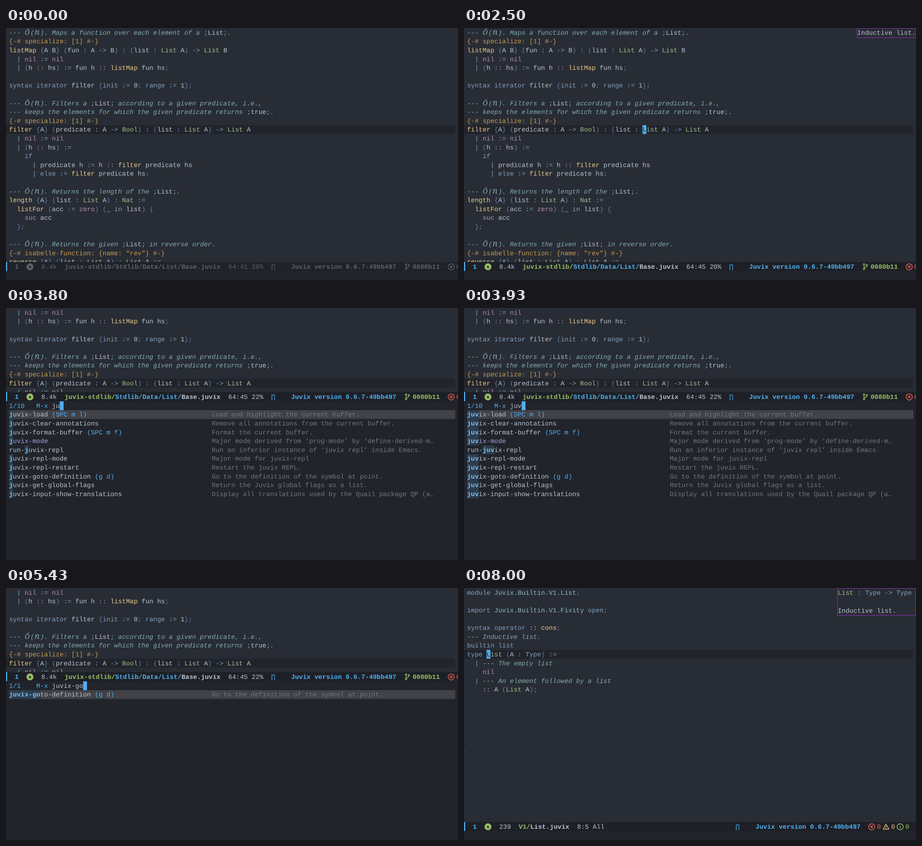
An HTML page with a canvas that plays this animation: 1000x560 px, repeating every 9.16 s.

```html
<!DOCTYPE html>
<html lang="en">
<head>
<meta charset="utf-8">
<title>Go to definition</title>
<style>
html, body { margin: 0; width: 100%; height: 100%; overflow: hidden; background: #282c34; }
canvas { display: block; width: 1000px; height: 560px; }
</style>
</head>
<body>
<canvas id="stage"></canvas>
<script>
const LOOP = 9160;
const CW = 8.625, LH = 19.6, X0 = 6.7, Y0 = 0.3;
const SIZE = '14.375px', MONO = '"Liberation Mono", "Noto Sans Mono", monospace';
const C = {
  bg: '#282c34', dark: '#21242b', bar: '#1d2026', fg: '#bbc2cf', dim: '#5b6268',
  blue: '#51afef', green: '#98be65', red: '#e8655f', yellow: '#ecbe7b', violet: '#a9a1e1',
  kw: '#81a1c1', fn: '#ebcb8b', type: '#a3be8c', con: '#b48ead', mod: '#8fbcbb',
  delim: '#5e81ac', note: '#83adad', pragma: '#c89b50', hint: '#73767d',
  row: '#404247', match: '#2c3d4e', hit: '#7cbdee', frame: '#7d2fab', tilde: '#4b5059'
};

const canvas = document.getElementById('stage');
const ctx = canvas.getContext('2d');
const dpr = window.devicePixelRatio || 1;
canvas.width = 1000 * dpr;
canvas.height = 560 * dpr;

const baseCode = `--- @ Maps a function over each element of a ;List;.
{-# specialize: [1] #-}
listMap {A B} (fun : A -> B) : (list : List A) -> List B
  | nil := nil
  | (h :: hs) := fun h :: listMap fun hs;

syntax iterator \`filter {init := 0; range := 1};

--- @ Filters a ;List; according to a given predicate, i.e.,
--- keeps the elements for which the given predicate returns ;true;.
{-# specialize: [1] #-}
filter {A} (predicate : A -> Bool) : (list : List A) -> List A
  | nil := nil
  | (h :: hs) :=
    if
      | predicate h := h :: filter predicate hs
      | else := filter predicate hs;

--- @ Returns the length of the ;List;.
length {A} (list : List A) : Nat :=
  listFor (acc := zero) (_ in list) {
    suc acc
  };

--- @ Returns the given ;List; in reverse order.
{-# isabelle-function: {name: "rev"} #-}
reverse {A} (list : List A) : List A :=`.split('\n');

const listCode = `module Juvix.Builtin.V1.List;

import Juvix.Builtin.V1.Fixity open;

syntax operator \`:: cons;
--- Inductive list.
builtin ^list
type List (A : Type) :=
  | --- The empty list
    nil
  | --- An element followed by a list
    :: A (List A);`.split('\n');

// name | key binding | description
const parseRows = text => text.split('\n').map(l => l.split('|'));
const allCommands = parseRows(`juvix-load|(SPC m l)|Load and highlight the current buffer.
juvix-clear-annotations||Remove all annotations from the current buffer.
markdown-export||Run Markdown on the current buffer, save to file, and re…
projectile-save-project-buffers|(SPC p s)|Save all project buffers.
project-query-replace-regexp||Query-replace REGEXP in all the files of the project.
+lookup/references|(SPC c D)|Show a list of usages of IDENTIFIER (defaults to the sym…
query-replace-regexp|(C-M-%)|Replace some things after point matching REGEXP with TO-…
projectile-replace-regexp||Replace a regexp in the project using ‘tags-query-replac…
regexp-builder||Construct a regexp interactively.
magit-blame||Show the commits that added or removed lines in the visi…
doom-big-font-mode|(SPC t b)|Globally resizes your fonts for streams, screen-sharing …
lsp-workspace-restart||Restart the workspace WORKSPACE and the language server …
magit-abort-dwim||Abort current operation.
lsp||Entry point for the server startup.
lsp-goto-implementation||Find implementations of the symbol under point.
sort-lines||Sort lines in region alphabetically; REVERSE non-nil mea…
auto-revert-mode||Toggle reverting buffer when the file changes (Auto-Reve…`);
const juvixCommands = parseRows(`juvix-load|(SPC m l)|Load and highlight the current buffer.
juvix-clear-annotations||Remove all annotations from the current buffer.
juvix-format-buffer|(SPC m f)|Format the current buffer.
juvix-mode||Major mode derived from ‘prog-mode’ by ‘define-derived-m…
run-juvix-repl||Run an inferior instance of ‘juvix repl’ inside Emacs.
juvix-repl-mode||Major mode for juvix-repl
juvix-repl-restart||Restart the juvix REPL.
juvix-goto-definition|(g d)|Go to the definition of the symbol at point.
juvix-get-global-flags||Return the Juvix global flags as a list.
juvix-input-show-translations||Display all translations used by the Quail package QP (a…`);

const words = {
  kw: 'syntax iterator init range if else in module import operator open builtin type Type | : := ->',
  fn: 'listMap filter length listFor reverse cons',
  type: 'List Bool Nat',
  con: 'nil zero suc ::',
  delim: '{ } ( ) ;'
};
const colorOf = {};
for (const k in words) for (const w of words[k].split(' ')) colorOf[w] = C[k];

const rowTop = i => Y0 + i * LH;

function rect(x, y, w, h, color) {
  ctx.fillStyle = color;
  ctx.fillRect(x, y, w, h);
}

// Writes on the character grid and returns the x after the text.
function put(s, x, top, color, style = '') {
  ctx.font = `${style} ${SIZE} ${MONO}`;
  ctx.fillStyle = color;
  ctx.fillText(s, x, top + 14.4);
  return x + s.length * CW;
}

function bigO(x, top) {
  const script = (ch, at, size) => {
    ctx.font = `italic ${size}px "Noto Serif", "DejaVu Serif", serif`;
    ctx.fillStyle = C.note;
    ctx.fillText(ch, at, top + 14.4);
  };
  script('O', x, 15);
  ctx.strokeStyle = C.note;
  ctx.lineWidth = 1;
  ctx.beginPath();
  ctx.arc(x + 8, top + 4, 2.6, 2.6, 5.6);
  ctx.stroke();
  x = put('(', x + 12.9, top, C.note, 'italic');
  script('n', x + 0.5, 18);
  return put(').', x + 12.9, top, C.note, 'italic');
}

function comment(s, x, top) {
  for (const part of s.split(/(@|;\w+;)/)) {
    if (part === '@') x = bigO(x, top);
    else if (part[0] === ';') {
      x = put(';', x, top, C.note);
      x = put(part.slice(1, -1), x, top, C.fg);
      x = put(';', x, top, C.note);
    } else x = put(part, x, top, C.note, 'italic');
  }
}

function codeLine(line, x, top) {
  if (line.startsWith('{-#')) return put(line, x, top, C.pragma);
  const cut = line.indexOf('---');
  const code = cut < 0 ? line : line.slice(0, cut);
  for (let t of code.match(/\s+|[`^]?(?:[\w.]+|::)|:=|->|\S/g) || []) {
    let color = colorOf[t] || (/\w\.\w/.test(t) ? C.mod : C.fg);
    if (t[0] === '`' || t[0] === '^') {
      color = t[0] === '^' ? C.kw : C.fg;
      t = t.slice(1);
    }
    x = put(t, x, top, color);
  }
  if (cut >= 0) comment(line.slice(cut), x, top);
}

function buffer(lines, first, current, bottom) {
  ctx.save();
  ctx.beginPath();
  ctx.rect(0, 0, 1000, bottom);
  ctx.clip();
  rect(0, rowTop(current - first), 994, LH, C.dark);
  lines.slice(first).forEach((l, i) => codeLine(l, X0, rowTop(i)));
  ctx.restore();
}

function cursor(col, top, ch = '') {
  const x = X0 + col * CW;
  rect(x, top, CW, LH, C.blue);
  put(ch, x, top, C.dark);
}

function ring(x, y, color) {
  ctx.strokeStyle = color;
  ctx.lineWidth = 1.5;
  ctx.beginPath();
  ctx.arc(x, y, 6.8, 0, 7);
  ctx.stroke();
}

function lines(color, width, ...paths) {
  ctx.strokeStyle = color;
  ctx.lineWidth = width;
  ctx.beginPath();
  for (const p of paths)
    for (let i = 0; i < p.length; i += 2) ctx[i ? 'lineTo' : 'moveTo'](p[i], p[i + 1]);
  ctx.stroke();
}

function errorIcon(x, y, color) {
  ring(x, y, color);
  lines(color, 1.7, [x - 2.5, y - 2.5, x + 2.5, y + 2.5], [x - 2.5, y + 2.5, x + 2.5, y - 2.5]);
}

function warnIcon(x, y, color) {
  lines(color, 1.5, [x - 6.5, y + 5.3, x, y - 6, x + 6.5, y + 5.3, x - 7, y + 5.3], [x, y - 2, x, y + 1.8], [x, y + 2.8, x, y + 4]);
}

function infoIcon(x, y, color) {
  ring(x, y, color);
  lines(color, 1.6, [x, y - 0.8, x, y + 3.8], [x, y - 3.6, x, y - 2]);
}

function branchIcon(x, y, color) {
  ctx.strokeStyle = color;
  ctx.lineWidth = 1.4;
  for (const [dx, dy] of [[-3, -5], [3.2, -3.5], [-3, 5]]) {
    ctx.beginPath();
    ctx.arc(x + dx, y + dy, 1.7, 0, 7);
    ctx.stroke();
  }
  ctx.beginPath();
  ctx.moveTo(x - 3, y - 3.2);
  ctx.lineTo(x - 3, y + 3.2);
  ctx.moveTo(x + 3.2, y - 1.8);
  ctx.quadraticCurveTo(x + 3, y + 1.3, x - 3, y + 2);
  ctx.stroke();
}

function modeline(top, size, path, place, focused, shift) {
  const tint = c => focused ? c : C.dim;
  const mid = top + 10.7, B = 'bold';
  rect(0, top, 1000, 20, focused ? C.bar : '#1f2228');
  rect(0, top, 2.5, 20, C.blue);
  const tt = top + 0.6;
  put('1', 19.5, tt, tint(C.blue), B);
  ctx.fillStyle = tint(C.green);
  ctx.beginPath();
  ctx.arc(53, mid, 7.6, 0, 7);
  ctx.fill();
  ctx.font = 'bold 9px ' + MONO;
  ctx.fillStyle = C.bar;
  ctx.fillText('N', 50.3, mid + 3.1);
  let x = put(size, 78, tt, tint(C.fg)) + 17;
  const tints = [C.green, C.blue];
  path.forEach((p, i) => {
    x = put(p, x, tt, tint(i === path.length - 1 ? C.fg : tints[i]), B);
  });
  put(place, x + 17.3, tt, tint(C.fg));
  put('∏', 587 + shift, tt, tint(C.blue));
  put('Juvix version 0.6.7-49bb497', 630.8 + shift, tt, tint(C.blue), B);
  return { tt, mid, tint };
}

function baseModeline(top, place, focused) {
  const { tt, mid, tint } = modeline(top, '8.4k', ['juvix-stdlib/', 'Stdlib/Data/List/', 'Base.juvix'], place, focused, 0);
  branchIcon(888, mid - 0.2, tint(C.green));
  put('0080b11', 899.5, tt, tint(C.green), 'bold');
  errorIcon(985, mid, tint(C.red));
  put('0', 996, tt, tint(C.red));
}

function listModeline() {
  const { tt, mid } = modeline(520, '239', ['V1/', 'List.juvix'], '8:5 All', true, 14);
  errorIcon(902, mid, C.red);
  put('0', 913.7, tt, C.red);
  warnIcon(933.5, mid, C.yellow);
  put('0', 945, tt, C.yellow);
  infoIcon(965, mid, C.green);
  put('0', 976.3, tt, C.green);
}

function popup(x, text) {
  const h = text.length * LH + 1.4;
  rect(x, 0, 1000 - x, h, C.bg);
  ctx.strokeStyle = C.frame;
  ctx.lineWidth = 1.3;
  ctx.strokeRect(x + 0.5, 0.5, 999 - x, h);
  text.forEach((s, i) => codeLine(s, x + 1, rowTop(i) + 0.7));
}

function candidate([name, key, desc], i, match) {
  const top = 227 + i * LH;
  if (!i) rect(X0, top, 987.3, LH, C.row);
  const color = name === 'juvix-mode' && match ? C.violet : C.fg;
  const at = match ? name.indexOf(match) : 0;
  let x = put(name.slice(0, at), X0, top, color);
  if (match) rect(x, top, match.length * CW, LH, C.match);
  x = put(match, x, top, C.hit, 'bold');
  x = put(name.slice(at + match.length), x, top, color);
  put(key, x + CW, top, C.blue);
  put(desc, X0 + 52 * CW, top, C.hint);
}

const latest = (steps, t) => steps.reduce((v, [at, x]) => t >= at ? x : v, '');
const typed = [[3720, 'j'], [3800, 'ju'], [3900, 'juv'], [4070, 'juvi'], [4200, 'juvix'], [4300, 'juvix-'], [4470, 'juvix-g'], [4600, 'juvix-go']];
const matched = [[3760, 'j'], [3840, 'ju'], [3930, 'juv'], [4120, 'juvi'], [4250, 'juvix'], [4370, 'juvix-'], [4540, 'juvix-g'], [4700, 'juvix-go']];

function prompt(t) {
  rect(0, 207, 1000, 353, C.dark);
  const input = latest(typed, t), match = latest(matched, t);
  const rows = match ? juvixCommands.filter(r => r[0].includes(match)) : allCommands;
  const count = '1/' + (match ? rows.length : 8306);
  put(count.padEnd(7) + 'M-x ', X0, 207.4, C.blue);
  put(input, X0 + 11 * CW, 207.4, C.fg);
  cursor(11 + input.length, 207.4);
  rows.forEach((r, i) => candidate(r, i, match));
}

function baseScene(t) {
  const focused = t >= 30;
  const col = t < 1730 ? 41 : t < 1930 ? 43 : 45;
  buffer(baseCode, 0, 11, 520);
  if (focused) cursor(col, rowTop(11), baseCode[11][col]);
  baseModeline(520, `64:${col} 20%`, focused);
  if (t >= 2400) popup(869, ['Inductive list.']);
  if (t >= 3230) put('SPC-', X0, 540.6, C.fg);
}

function commandScene(t) {
  buffer(baseCode, 3, 11, 187);
  baseModeline(187, '64:45 22%', true);
  prompt(t);
}

function echo() {
  const x = put('You can run the command ‘juvix-goto-definition’ with ', X0, 540.6, C.fg);
  rect(x, 541, 3 * CW, 18.5, '#34362f');
  ctx.strokeStyle = '#50514b';
  ctx.lineWidth = 1;
  ctx.strokeRect(x + 0.5, 541.5, 3 * CW - 1, 18);
  put('g d', x, 540.6, C.fg);
}

function listScene(t) {
  buffer(listCode, 0, 7, 520);
  cursor(5, rowTop(7), 'L');
  ctx.font = '11px ' + MONO;
  ctx.fillStyle = C.tilde;
  for (let i = 12; i < 26; i++) ctx.fillText('~', 0, rowTop(i) + 13.2);
  listModeline();
  if (t >= 5900) popup(826, ['List : Type -> Type', '', 'Inductive list.']);
  if (t >= 5970 && t < 8000) echo();
}

function draw(t) {
  ctx.setTransform(dpr, 0, 0, dpr, 0, 0);
  ctx.textRendering = 'geometricPrecision';
  ctx.fontKerning = 'none';
  rect(0, 0, 1000, 560, C.bg);
  rect(0, 540, 1000, 20, C.dark);
  if (t < 3370) baseScene(t);
  else if (t < 5830) commandScene(t);
  else listScene(t);
}

let start;
function tick(now) {
  start ??= now;
  draw((now - start) % LOOP);
  requestAnimationFrame(tick);
}
requestAnimationFrame(tick);
</script>
</body>
</html>
```
